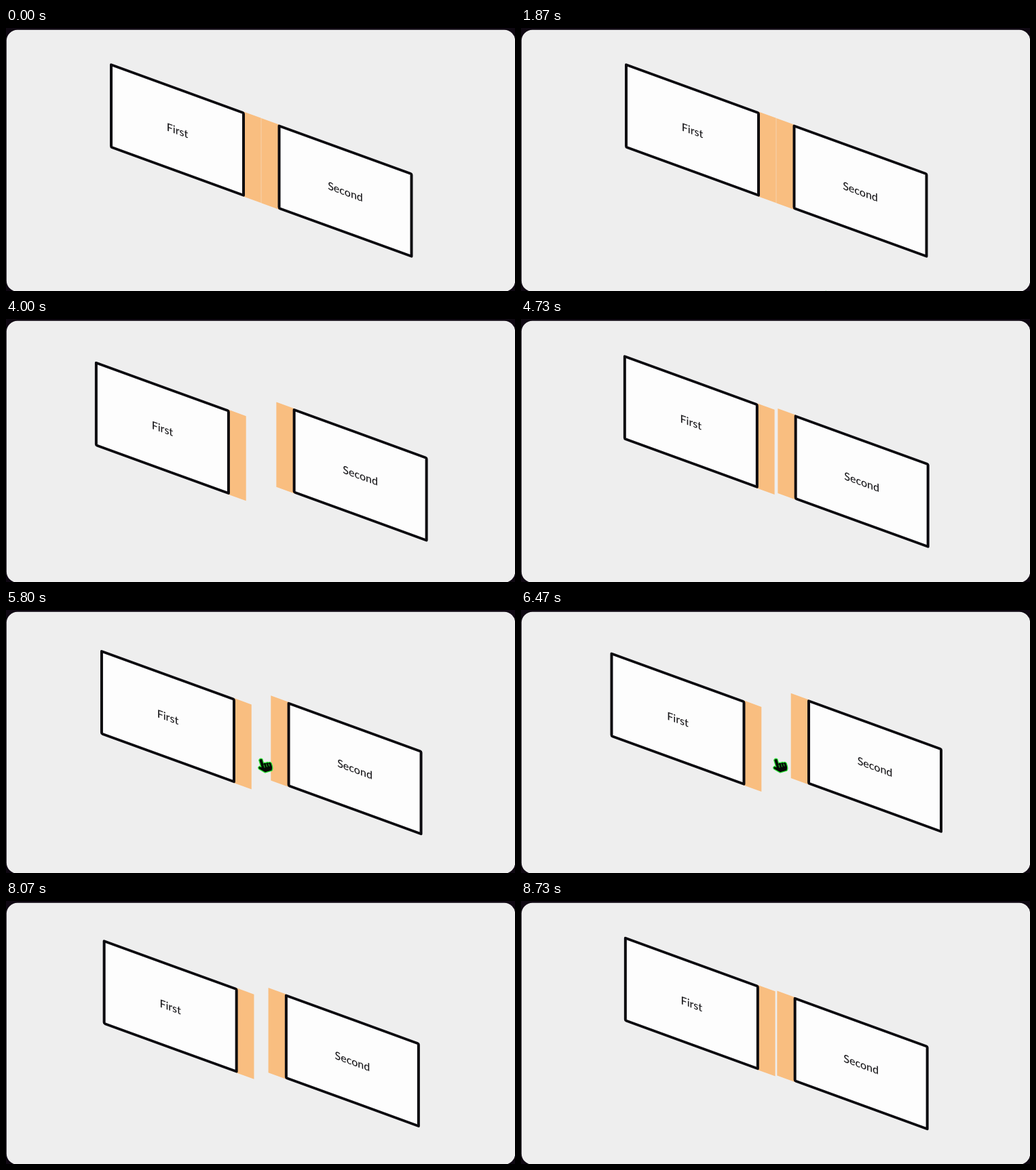
An HTML page that plays this animation: 750x388 px, repeating every 8.79 s.

```html
<!DOCTYPE html>
<html lang="en">
<head>
<meta charset="utf-8">
<title>Split panels</title>
<style>
  html, body { margin: 0; width: 100%; height: 100%; overflow: hidden; background: #0f0812; }
  svg { display: block; width: 100%; height: 100%; }
  .card { fill: #fdfdfd; stroke: #0b0a0f; stroke-width: 4; }
  .gap { fill: #f9be80; }
  text { font: 500 16px Lato, sans-serif; fill: #19181b; text-anchor: middle; }
  .hand { fill: #050805; stroke: #2be336; stroke-width: 2.6; stroke-linejoin: round; paint-order: stroke; }
  .knuckles { fill: none; stroke: #2be336; stroke-width: .8; }
</style>
</head>
<body>
<svg viewBox="0 0 750 388">
  <rect width="750" height="388" fill="#0f0812"/>
  <rect x=".8" y="2.8" width="749.4" height="386" rx="16" fill="#eee"/>
  <g id="first">
    <rect class="gap" x="97" y="-62.6" width="26.3" height="125.2"/>
    <rect class="card" x="-97.5" y="-60.75" width="195" height="121.5" rx=".8"/>
    <text y="6.5">First</text>
  </g>
  <g id="second">
    <rect class="gap" x="-123.8" y="-62.6" width="26.8" height="125.2"/>
    <rect class="card" x="-97.5" y="-60.75" width="195" height="121.5" rx=".8"/>
    <text y="6.5">Second</text>
  </g>
  <g id="cursor">
    <path class="hand" d="M-2 1Q0-1 2 1V8Q4 6.5 6 8.3Q8 7 9.5 9Q12 8 13 10.5V15Q13 18 11 20.5H1L-6 13Q-7 10.5-4.5 10.3L-2 12.3Z"/>
    <path class="knuckles" d="M2.2 9v5M5.9 9.5v4.5M9.4 10v4"/>
  </g>
</svg>
<script>
  const LOOP = 8790, SPREAD = 22.4, TAU = 300, RISE = 0.47;
  const hovers = [[2700, 4035], [5505, 7840]];

  // Each visit: time it is gone, then [time, x, y] stops of the fingertip.
  const visits = [
    { end: 3735, stops: [[1850, 449, 390], [2330, 400, 256], [2530, 400, 256], [2720, 392, 239]] },
    { end: 7540, stops: [[5330, 400, 390], [5560, 375, 220]] }
  ];

  const el = id => document.getElementById(id);
  const first = el('first'), second = el('second'), cursor = el('cursor');
  const smooth = p => p * p * (3 - 2 * p);

  // Exponential approach, opening and then closing.
  function spread(t) {
    let s = 0;
    for (const [on, off] of hovers) {
      if (t < on) break;
      const open = SPREAD * (1 - Math.exp((on - Math.min(t, off)) / TAU));
      s = t < off ? open : open * Math.exp((off - t) / TAU);
    }
    return s;
  }

  function pointer(t) {
    const visit = visits.find(v => t >= v.stops[0][0] && t < v.end);
    if (!visit) return null;
    const { stops } = visit;
    const i = stops.findIndex(p => p[0] > t);
    if (i < 0) return stops[stops.length - 1].slice(1);
    const [t0, x0, y0] = stops[i - 1], [t1, x1, y1] = stops[i];
    const p = smooth((t - t0) / (t1 - t0));
    return [x0 + (x1 - x0) * p, y0 + (y1 - y0) * p];
  }

  function place(node, x, y, extra) {
    node.setAttribute('transform', `translate(${x} ${y}) ${extra}`);
  }

  function render(t) {
    const s = spread(t), at = pointer(t);
    place(first, 252.5 - s, 150.5 + s * RISE, 'skewY(20)');
    place(second, 500 + s, 240.6 - s * RISE, 'skewY(20)');
    cursor.style.display = at ? '' : 'none';
    if (at) place(cursor, at[0], at[1], 'rotate(-17)');
  }

  const start = performance.now();
  function tick() {
    render((performance.now() - start) % LOOP);
    requestAnimationFrame(tick);
  }
  tick();
</script>
</body>
</html>
```
